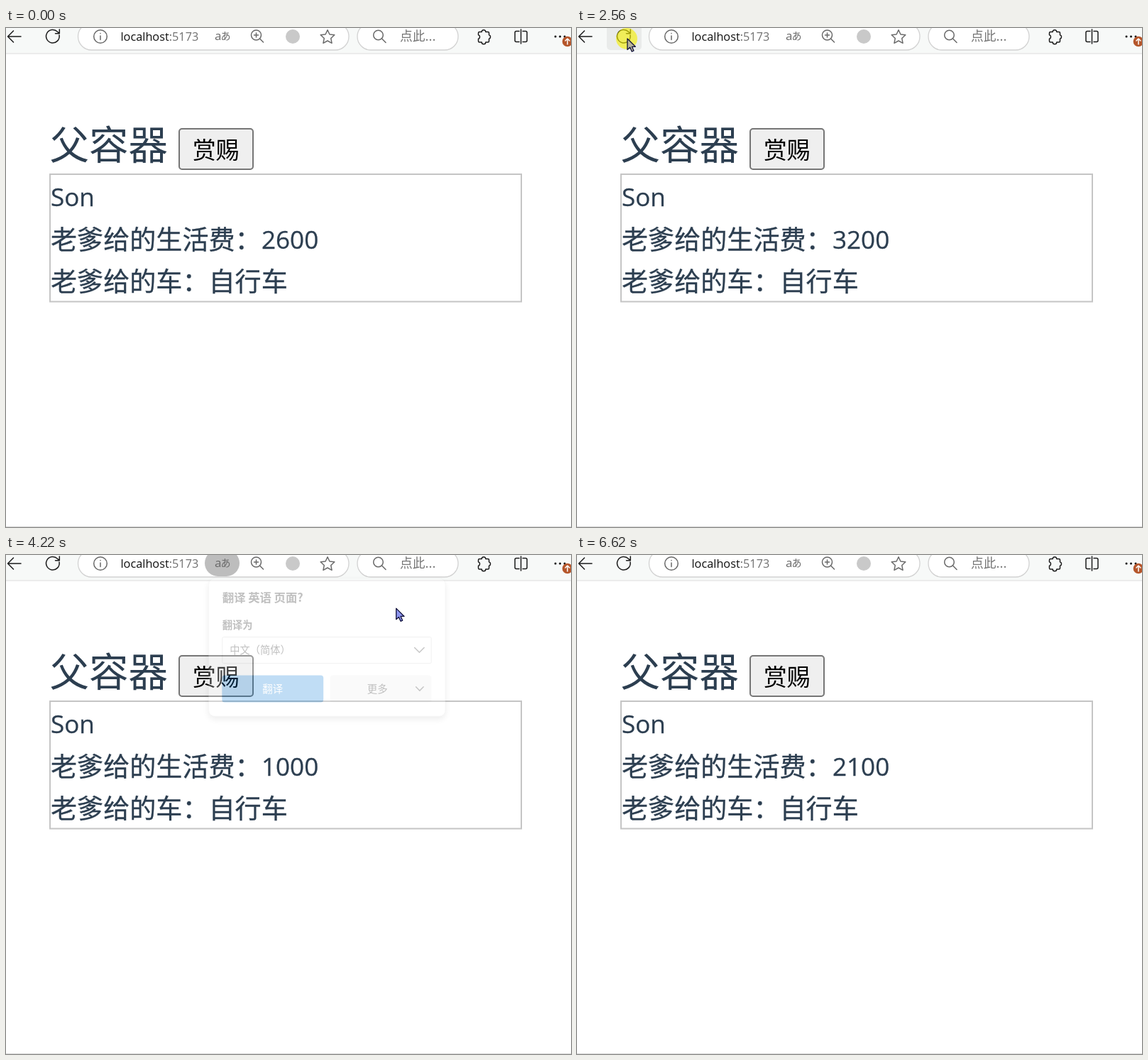
Write an HTML page that moves like this. It is 796 by 703 pixels and loops after 7180 ms.

```html
<!DOCTYPE html>
<html lang="zh-CN">
<head>
<meta charset="utf-8">
<title>父容器</title>
<style>
  html, body { margin: 0; width: 100%; height: 100%; overflow: hidden; background: #fff; }
  svg { display: block; }
  text { font-family: "Open Sans", "Noto Sans CJK SC", "Noto Sans CJK", sans-serif; }
  .cjk { font-family: "Noto Sans CJK SC", "Noto Sans CJK", sans-serif; }
  .page { fill: #2c3e50; }
  .body { stroke: #2c3e50; stroke-width: .3; }
  .line { fill: none; stroke-width: 1.5; stroke-linecap: round; stroke-linejoin: round; }
  .dark { stroke: #1b1b1b; }
  .gray { stroke: #6a6a6a; }
  #popup { filter: drop-shadow(0 4px 5px rgba(0, 0, 0, .3)); }
</style>
</head>
<body>
<svg width="796" height="703" viewBox="0 0 796 703">
  <rect width="796" height="703" fill="#fff"/>

  <g id="toolbar">
    <rect width="796" height="36" fill="#f7f9f8"/>
    <rect y="35" width="796" height="2" fill="#ececec"/>
    <rect id="reload" x="42" y="-8" width="49" height="39" rx="5" fill="#e9ebea"/>
    <path class="line dark" d="M21 12H3M10.500 4L2.500 12l8 8"/>
    <path class="line dark" d="M75 10A9.300 9.300 0 1 1 72.500 5.200L75 7.600M75.300 2v5.800h-5.800"/>
    <rect id="address" x="101.500" y="-7" width="381.500" height="38" rx="19" stroke="#d2d2d2" stroke-width="1.300"/>
    <rect x="495" y="-7" width="142" height="38" rx="19" fill="#fff" stroke="#d2d2d2" stroke-width="1.300"/>
    <g class="line gray">
      <circle cx="133" cy="12" r="9.300"/>
      <path d="M133 11v5.500M133 7.500v.2"/>
    </g>
    <text x="161.500" y="17.500" font-size="16.300" fill="#111">localhost<tspan fill="#707070">:5173</tspan></text>
    <rect id="lang" x="280" y="-7" width="49" height="37" rx="18.500" fill="#bdbdbd"/>
    <text x="294" y="16.500" font-size="17" fill="#6a6a6a">a</text>
    <text class="cjk" x="302.500" y="16" font-size="14" fill="#6a6a6a">あ</text>
    <g class="line gray">
      <circle cx="352.500" cy="10" r="7"/>
      <path d="M357.500 15l5 5M349.500 10h6M352.500 7v6"/>
      <path id="star"/>
      <circle cx="524.500" cy="10" r="6.800"/>
      <path d="M529.500 15l5.500 5.500"/>
    </g>
    <circle cx="404" cy="12" r="10" fill="#c9c9c9"/>
    <text class="cjk" x="555" y="18" font-size="17.800" fill="#757575">点此...</text>
    <g class="line dark">
      <path d="M667 5.500h3.200a2.800 2.800 0 0 1 5.600 0h3.200a1.500 1.500 0 0 1 1.500 1.500v2.800a2.800 2.800 0 0 1 0 5.400v3.300a1.500 1.500 0 0 1-1.500 1.500h-3.200a2.800 2.800 0 0 1-5.600 0h-3.200a1.500 1.500 0 0 1-1.500-1.500v-3.300a2.800 2.800 0 0 0 0-5.400v-2.800a1.500 1.500 0 0 1 1.500-1.500z"/>
      <path d="M723 4.500h-4a2 2 0 0 0-2 2v11a2 2 0 0 0 2 2h4M728 4.500h4a2 2 0 0 1 2 2v11a2 2 0 0 1-2 2h-4M725.500 2v20"/>
    </g>
    <path d="M774 12h.1M780.500 12h.1M787 12h.1" stroke="#1b1b1b" stroke-width="3" stroke-linecap="round"/>
    <circle cx="791" cy="19" r="7.300" fill="#b5562b"/>
    <path class="line" stroke="#fff" d="M791 23v-8M788 18l3-3 3 3"/>
  </g>

  <text class="cjk page" x="61.500" y="185" font-size="55.500">父容器</text>
  <rect id="button" x="244" y="142" width="104" height="57" rx="4" stroke-width="2"/>
  <text class="cjk" x="263" y="183.500" font-size="32.700">赏赐</text>
  <rect x="62" y="206" width="664" height="179.500" fill="none" stroke="#c5c5c5" stroke-width="2"/>
  <g class="body">
    <text class="page" x="63" y="250.500" font-size="35">Son</text>
    <text class="cjk page" x="63" y="312" font-size="37.100">老爹给的生活费：</text>
    <text id="money" class="page" x="360" y="310.500" font-size="35.100"></text>
    <text class="cjk page" x="63" y="371" font-size="37.100">老爹给的车：自行车</text>
  </g>
  <rect y="702" width="796" height="1" fill="#dcdcdc"/>

  <g id="popup">
    <rect x="279" y="29" width="346.500" height="202" rx="9" fill="#fff" stroke="#d6d6d6" stroke-width=".6"/>
    <text class="cjk" x="299" y="63" font-size="17" font-weight="700">翻译 英语 页面?</text>
    <text class="cjk" x="299" y="102.500" font-size="14.800" font-weight="700">翻译为</text>
    <rect x="299" y="115" width="306" height="38.500" rx="2" fill="#fff" stroke="#c4c4c4"/>
    <text class="cjk" x="310" y="139.500" font-size="14.800">中文（简体）</text>
    <rect x="298.500" y="171" width="148.500" height="39.500" rx="4" fill="#0078d7"/>
    <text class="cjk" x="372.800" y="196" font-size="15" fill="#fff" text-anchor="middle">翻译</text>
    <rect x="457" y="171" width="148" height="39.500" rx="4" fill="#eee"/>
    <text class="cjk" x="526" y="196" font-size="15" text-anchor="middle">更多</text>
    <path class="line dark" d="M580.500 130.500l7 7 7-7M582.500 188l5.500 5.500 5.500-5.500"/>
    <path id="close" class="line dark" d="M598.500 41l13.500 13.500M612 41l-13.500 13.500"/>
  </g>

  <circle id="press" r="15" fill="#f4ef00" opacity=".62"/>
  <path id="cursor" d="M0 0V15.500L3.700 12.300L6.300 18.200L9 17L6.400 11.300H11.300Z" stroke="#12123c" stroke-width="1.300" stroke-linejoin="round"/>
</svg>

<script>
const LOOP = 7180;
const $ = id => document.getElementById(id);
const clamp = v => Math.max(0, Math.min(1, v));
const within = (t, a, b) => t >= a && t < b;
const show = (id, on) => $(id).setAttribute("display", on ? "inline" : "none");

// time, x, y of the pointer tip
const path = [
  [60, 716, 655], [400, 480, 380], [700, 309, 162], [1880, 309, 162],
  [2180, 150, 24], [2350, 71, 15], [2620, 71, 15], [2900, 215, 356],
  [3120, 290, 212], [3260, 296, 200], [3800, 600, 44], [3960, 600, 44],
  [4220, 550, 75], [4600, 328, 168], [6390, 328, 168], [6500, 470, 370],
  [6620, 684, 679]
];

// press and release times of the button
const clicks = [
  [950, 1040], [1130, 1210], [1300, 1390], [1480, 1560], [1650, 1700], [1790, 1880],
  [4690, 4780], [4870, 4980], [5060, 5150], [5270, 5390],
  [5460, 5520], [5590, 5660], [5730, 5800], [5880, 5950], [6020, 6110],
  [6230, 6280], [6340, 6390]
];
const RELOAD = 2680;

// slope at a key, flat at turning points so that rests stay still
function slope(i, k) {
  if (i === 0 || i === path.length - 1) return 0;
  const rate = j => (path[j + 1][k] - path[j][k]) / (path[j + 1][0] - path[j][0]);
  const a = rate(i - 1), b = rate(i);
  return a * b > 0 ? 2 * a * b / (a + b) : 0;
}

function pointer(t) {
  let i = 0;
  while (i < path.length - 2 && t >= path[i + 1][0]) i++;
  const p = path[i], q = path[i + 1], d = q[0] - p[0];
  const u = clamp((t - p[0]) / d), v = 1 - u;
  return [1, 2].map(k =>
    p[k] * v * v * (1 + 2 * u) + q[k] * u * u * (3 - 2 * u) +
    d * u * v * (slope(i, k) * v - slope(i + 1, k) * u));
}

function money(t) {
  const from = t < RELOAD ? 0 : RELOAD;
  const n = clicks.filter(c => c[1] > from && c[1] <= t).length;
  return (from ? 1000 : 2600) + 100 * n;
}

function draw(t) {
  const [x, y] = pointer(t);
  const visible = within(t, 60, 6620);
  const down = clicks.some(c => within(t, c[0], c[1]));
  const pressed = down || within(t, 2350, 2620);
  const popup = Math.min(clamp((t - 3050) / 140), clamp((4250 - t) / 120));
  const hover = visible && !popup && x > 243 && x < 349 && y > 141 && y < 200;

  $("money").textContent = money(t);
  $("button").setAttribute("fill", down ? "#f5f5f5" : hover ? "#e5e5e5" : "#efefef");
  $("button").setAttribute("stroke", down ? "#8d8d8d" : hover ? "#4f4f4f" : "#767676");
  $("address").setAttribute("fill", within(t, 1900, 2900) && x > 101 && x < 483 && y < 31 ? "#f3f3f3" : "#fff");
  show("reload", within(t, 2420, 2680));
  show("lang", within(t, 3050, 4290));

  show("popup", popup > 0);
  show("close", t < 4130);
  $("popup").setAttribute("opacity", popup);
  const s = 1 - .05 * (1 - popup);
  $("popup").setAttribute("transform", `translate(452 131) scale(${s}) translate(-452 -131)`);

  show("cursor", visible);
  $("cursor").setAttribute("transform", `translate(${x} ${y})`);
  $("cursor").setAttribute("fill", pressed ? "#b9b59a" : "#8c94ee");
  show("press", pressed);
  $("press").setAttribute("cx", x - 1);
  $("press").setAttribute("cy", y);
}

const points = Array.from({ length: 10 }, (_, i) => {
  const a = Math.PI * (i / 5 - .5), r = i % 2 ? 5 : 10.3;
  return `${453 + r * Math.cos(a)} ${13 + r * Math.sin(a)}`;
});
$("star").setAttribute("d", `M${points.join("L")}Z`);

const start = performance.now();
function tick() {
  draw((performance.now() - start) % LOOP);
  requestAnimationFrame(tick);
}
tick();
</script>
</body>
</html>
```
